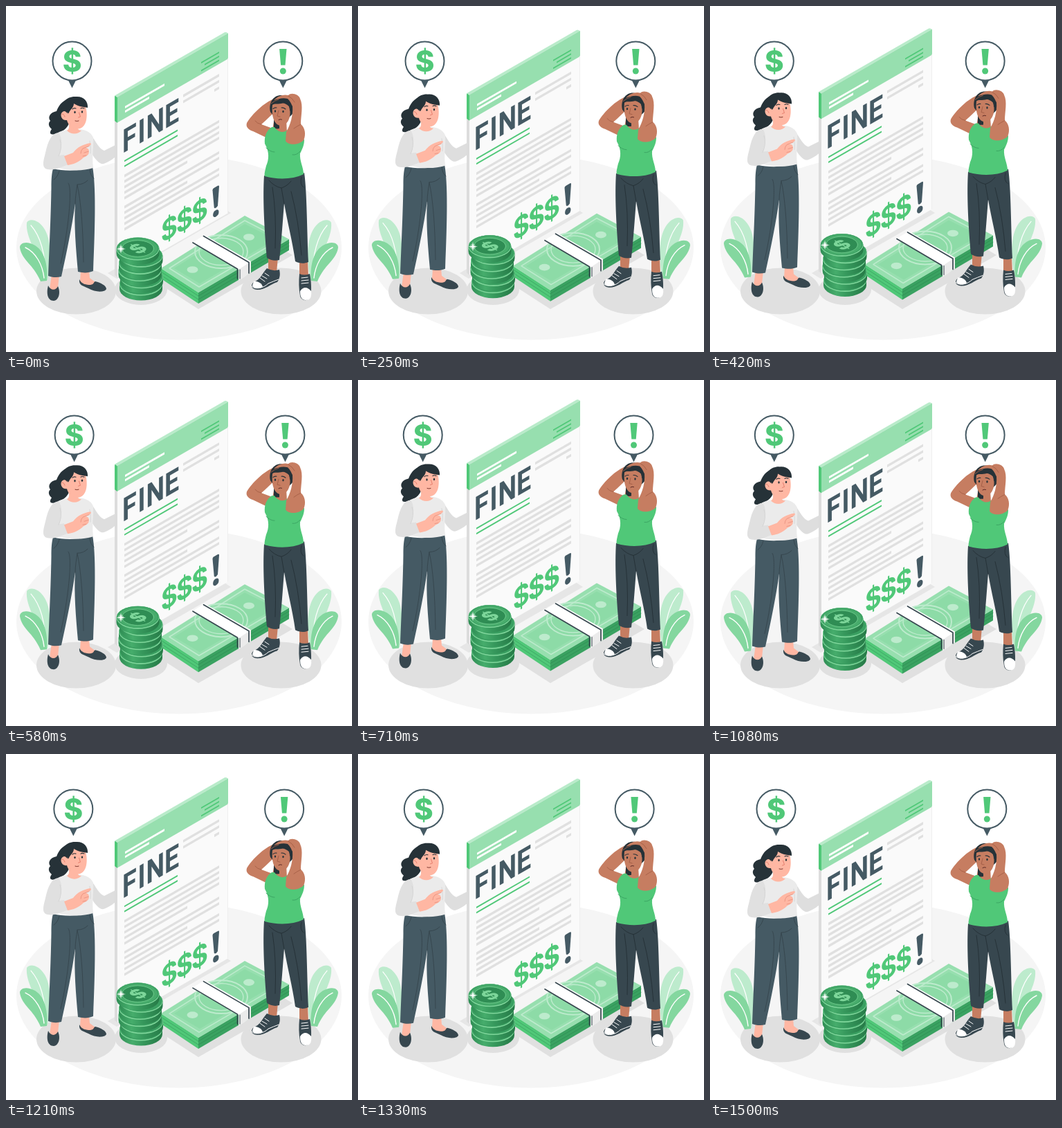
An HTML page with a canvas that plays this animation: 500x500 px, repeating every 1.54 s.

```html
<!DOCTYPE html>
<html lang="en">
<head>
<meta charset="utf-8">
<title>Fine</title>
<style>
html, body { margin: 0; width: 100%; height: 100%; overflow: hidden; background: #fff; }
canvas { display: block; width: 500px; height: 500px; }
</style>
</head>
<body>
<canvas id="stage"></canvas>
<script>
const canvas = document.getElementById('stage');
const ctx = canvas.getContext('2d');
const ratio = window.devicePixelRatio || 1;
canvas.width = canvas.height = 500 * ratio;

const GREEN = '#50c878', LIGHT = '#97dfaf', PALE = '#bdebcd', DEEP = '#2f8d54';
const SLATE = '#455a64', DARK = '#37474f', INK = '#263238';
const GREY = '#e0e0e0', PEACH = '#ffb7a3', BROWN = '#c67d61', SHADE = '#a55f47';
const ISO = 0.577;

const fill = (color, d) => { ctx.fillStyle = color; ctx.fill(new Path2D(d)); };

function stroke(color, width, d) {
  ctx.strokeStyle = color;
  ctx.lineWidth = width;
  ctx.lineCap = ctx.lineJoin = 'round';
  ctx.stroke(new Path2D(d));
}

function ellipse(color, x, y, rx, ry, angle = 0, line = 0) {
  ctx.beginPath();
  ctx.ellipse(x, y, rx, ry, angle, 0, 7);
  ctx.lineWidth = line;
  ctx.fillStyle = ctx.strokeStyle = color;
  line ? ctx.stroke() : ctx.fill();
}

function bar(color, x1, x2, y, height) {
  ctx.fillStyle = color;
  ctx.fillRect(x1, y - height / 2, x2 - x1, height);
}

function within(matrix, draw) {
  ctx.save();
  ctx.transform(...matrix);
  draw();
  ctx.restore();
}

const at = (x, y, draw) => within([1, 0, 0, 1, x, y], draw);

function label(text, font, color, align = 'center') {
  ctx.font = font;
  ctx.fillStyle = color;
  ctx.textAlign = align;
  ctx.fillText(text, 0, 0);
}

function ground() {
  ellipse('#f5f5f5', 250, 349, 235, 133.5);
  ellipse(GREY, 101.5, 412, 57.5, 33.5);
  ellipse(GREY, 397.5, 412, 58, 33.5);
  fill('#e6e6e6', 'M147 386L160 394L325 299L311 290Z');
  ellipse(GREY, 195, 410, 38, 22);
  fill(GREY, 'M216 398L278 438L414 360L345 318Z');
}

function plant() {
  fill(PALE, 'M60 396C66 366 65 338 56 323C48 309 34 306 30 313C28 335 45 352 54 396Z');
  stroke('#fff', 1.2, 'M36 317C51 334 57 358 57 392');
  fill('#84d79f', 'M59 397C61 373 55 354 42 346C30 339 20 342 20 349C23 368 39 372 50 398Z');
  stroke('#fff', 1.4, 'M28 349C43 356 53 374 55 393');
}

function page() {
  fill('#dcdcdc', 'M157 165L161 167L161 392L157 389Z');
  fill(GREEN, 'M157 131Q157 129 159 130L161 132L161 169L157 166Z');
  fill('#b9ebca', 'M157 129.5L316 38Q318 37 321 39.5L161 132Z');
  within([1, -ISO, 0, 1, 161, 131.5], () => {
    ctx.fillStyle = '#fafafa';
    ctx.fillRect(0, 0, 160, 260);
    ctx.fillStyle = LIGHT;
    ctx.fillRect(0, 0, 160, 37);
    bar('#ebebeb', 159.2, 160, 148, 224);
    bar('#fff', 11, 68, 21.3, 3.2);
    bar('#fff', 11, 46, 27.5, 3.2);
    bar(GREEN, 121, 147, 20.3, 2);
    bar(GREEN, 126, 147, 26, 2);
    bar(GREEN, 121, 147, 31.7, 2);
    [['F', 7], ['I', 29.5], ['N', 41.5], ['E', 68]].forEach(([letter, x]) =>
      within([0.8, 0, 0, 1, x, 85.7], () => label(letter, '700 47px Roboto, sans-serif', SLATE, 'left')));
    bar(GREEN, 10, 87, 98.4, 2.2);
    bar(GREEN, 10, 87, 105.8, 2.2);
    bar(GREY, 95, 147, 53.3, 3.8);
    bar(GREY, 95, 147, 62, 3.8);
    bar(GREY, 140, 147, 71.4, 3.8);
    [120, 128, 136, 144, 152, 165, 173, 181, 189, 197].forEach((y, i) =>
      bar(GREY, 10, i === 4 || i === 7 ? 101 : 147, y, 3.8));
    for (const x of [75, 97, 119])
      within([0.866, 0, 0, 1, x, 248], () => label('$', '700 42px Inter, sans-serif', GREEN));
    fill(SLATE, 'M137.5 214Q137.5 212 139.5 212L145 212Q147 212 147 214L145 241Q142.3 244 139.8 241Z');
    ellipse(SLATE, 142.3, 250.3, 4.2, 4.8);
  });
}

function money() {
  fill(GREEN, 'M224 379L278 414L278 430L224 394Z');
  fill('#3aa261', 'M278 414L409 337L409 353L278 430Z');
  for (const y of [5, 10]) {
    at(0, y, () => {
      stroke('#3aa261', 0.8, 'M224 379L278 414');
      stroke('#2f8d54', 0.8, 'M278 414L409 337');
    });
  }
  fill(LIGHT, 'M224 379L345 303L409 337L278 414Z');
  stroke(PALE, 1.6, 'M236 379L345 310L397 337L279 406Z');
  fill('#8ddba7', 'M243 379L345 315L389 337L280 401Z');
  ellipse(PALE, 311, 355, 38, 24, 0, 2);
  ellipse(PALE, 311, 355, 32, 19.5, 0, 1.4);
  ellipse(PALE, 269.5, 381, 8, 4.8);
  ellipse(PALE, 351, 334, 8, 4.8);
  fill('#fff', 'M269 342L287 331L354 369L354 385L336 397L336 381Z');
  fill('#ebebeb', 'M336 381L354 369L354 385L336 397Z');
  stroke(DARK, 1.7, 'M270 342L334.5 380L334.5 394M285.5 332.5L351 370.5L351 386');
  stroke(DARK, 1, 'M338 381L338 394');
}

function coin(x, y) {
  const edge = ctx.createLinearGradient(x - 31, 0, x + 31, 0);
  edge.addColorStop(0, '#2f8d54');
  edge.addColorStop(0.3, '#46ad6c');
  edge.addColorStop(0.55, '#36985c');
  edge.addColorStop(1, '#267a47');
  ctx.fillStyle = edge;
  ctx.beginPath();
  ctx.ellipse(x, y + 7, 31, 16.5, 0, 0, Math.PI);
  ctx.ellipse(x, y, 31, 16.5, 0, Math.PI, 0);
  ctx.fill();
  ellipse('#7fd69b', x, y, 31, 16.5);
  ellipse('#3a9f61', x, y - 0.7, 30.3, 15.6);
}

function coins() {
  [195, 196, 193.5, 194, 195.5, 190.5].forEach((x, i) => coin(x, 402 - i * 10.2));
  ellipse('#48ac6c', 190.5, 350.5, 28.5, 14.6);
  ellipse(DEEP, 190.5, 350.5, 22.5, 11.5);
  ellipse('#6fcb8d', 190.5, 350.5, 23, 11.8, 0, 0.9);
  within([0.87, -0.5, 0.87, 0.5, 198.6, 355.2], () =>
    label('$', '800 26px Inter, sans-serif', '#7dd69a'));
  ctx.globalAlpha = 0.35;
  ellipse('#fff', 166, 351, 4, 4);
  ctx.globalAlpha = 1;
  fill('#fff', 'M166 344L167 350L173 351L167 352L166 358L165 352L159 351L165 350Z');
}

function woman() {
  // Feet and trousers
  fill(PEACH, 'M66 388L77 388L75 407Q73 415 63 409ZM108 382L120 382L121 393Q128 398 132 402L116 405L107 398Z');
  fill(DARK, 'M61 404C64 411 72 412 75 405C79 413 77 425 69 426C60 426 58 415 61 404Z');
  fill(DARK, 'M106 395C109 402 116 403 122 403C128 402 126 399 129 398C137 400 145 404 145 409C143 414 129 414 119 408C111 404 105 404 106 395Z');
  fill(SLATE, 'M68 235C85 239 108 239 125 232C130 260 129 310 126 383C119 386 112 386 104 384C101 350 98 315 100 285C96 315 88 355 80 391C73 393 66 392 61 390C63 340 65 300 65.5 262C65.5 250 66 242 68 235Z');
  stroke(DARK, 1, 'M100 286C100 276 102 266 103 258Q112 258 118 252M90 256C96 262 91 320 79 372M103 258Q111 295 112 370M77 238Q75 247 69 251M121 236Q122 246 127 249');
  // Hair behind the head
  fill(INK, 'M88 135C77 140 75 148 73 152C63 154 60 161 64 166C59 171 64 176 66 178C62 183 64 187 70 185C80 182 90 178 92 166Z');
  // Sweater
  fill('#dedede', 'M122 185C130 196 135 207 142 209L158 201L158 218C151 224 142 229 138 228C131 225 126 217 122 210Z');
  fill('#ebebeb', 'M75 183C82 179 90 179 97 178C109 177 122 180 126 190C127 203 124 215 126 234C110 239 91 238 76 234C79 216 74 200 75 183Z');
  fill('#e0e0e0', 'M76 183C66 184 61 194 57 212C54 224 51 234 60 236C70 238 80 233 90 229L84 215L77 216C81 204 82 191 76 183Z');
  stroke('#d2d2d2', 0.8, 'M78 193Q82 205 76 217M121 195Q123 207 122 213');
  fill(PEACH, 'M89 166C92 172 92 178 88 180C95 187 105 185 109 180C104 180 103 177 104 172Z');
  fill(PEACH, 'M84 217L97 212C103 204 111 200 122 198C124.5 199.5 122 202.5 114 205C118 205 120.5 207 119.5 210C121 214 117 217 112 219C105 226 97 229 89 230Z');
  stroke('#e58f7d', 0.8, 'M120 202.5L111 206Q108 209 108 213M119.5 210L113 212M116 216L111 217');
  // Head
  fill(PEACH, 'M91 141C100 136 115 139 116 149C118 161 116 174 107 177C98 180 90 173 88 165C82 166 78 160 80 155C83 150 87 152 88 155Z');
  fill(INK, 'M81 153C78 139 89 130 101 131C112 130 119 138 118 147C112 146 104 145 98 141C98 147 93 149 91 154C89 157 89 154 88 153C86 150 83 151 81 153Z');
  ellipse(INK, 99.5, 153.5, 1.2, 1.7);
  ellipse(INK, 110, 153, 1.2, 1.7);
  stroke(INK, 1.1, 'M96 149Q98 147 101 148M108 148Q110 146.5 113 148');
  stroke('#e57f6e', 1, 'M105.5 154L107.5 160L104.5 161M81 156Q84 156 85 160');
  stroke('#7a352d', 1, 'M100 166Q102.5 167 105 166');
}

function worrier() {
  // Ankles and sneakers
  fill(BROWN, 'M379 361L393 363L391 385L379 384ZM424 368L436 369L437 390L424 390Z');
  fill(DARK, 'M377 379Q386 384 395 381C397 389 395 395 392 399C382 402 375 410 363 410C354 409 353 403 358 399C367 396 370 387 377 379Z');
  fill('#fff', 'M358 398C364 397 370 401 371 406C365 409 357 408 356 404Z');
  stroke('#fff', 1, 'M355 405C361 411 373 407 379 401Q386 398 394 395M370 390L377 394M367 393L374 398M374 386L380 390');
  fill(DARK, 'M424 387Q431 390 439 387C441 396 442 412 440 420C437 427 427 427 425 419C423 408 423 398 424 387Z');
  fill('#fff', 'M425 412Q432 402 441 412C442 422 439 425 433 425C427 425 425 420 425 412Z');
  stroke('#fff', 1, 'M427 393L436 392M427 397L437 396M427 401L437 400');
  fill(DARK, 'M373 245C390 250 415 250 431 241C435 268 435 330 437 370C430 373 424 372 418 369C414 340 406 310 402 285C400 310 398 340 395 367C388 369 382 367 377 364C373 320 371 275 373 245Z');
  stroke(INK, 1, 'M402 286L398 263Q388 261 380 252M398 263Q407 260 412 253M385 262Q391 300 389 350M427 247Q424 258 430 262M412 268Q423 310 427 360');
  // Far arm, neck, top
  fill(BROWN, 'M388 134C373 139 355 157 348 169C346 175 351 179 357 181L380 192L388 178L369 171C377 164 383 158 388 153Z');
  stroke(SHADE, 0.9, 'M369 171Q363 170 360 166');
  fill(BROWN, 'M388 162L405 165L406 182Q397 191 385 178Z');
  fill(INK, 'M387 164L395 171L395 177C391 178 388 177 387 175Z');
  fill(GREEN, 'M384 175C376 180 373 189 374 199C381 211 380 222 376 231C374 239 373 244 374 246C392 251 414 251 430 243C430 233 424 224 425 213C429 205 431 200 431 193L407 179C402 184 393 183 388 175Z');
  stroke('#3aa261', 0.9, 'M376 205Q382 211 388 211M425 210Q420 216 414 215');
  // Head
  fill(INK, 'M382 153C379 139 387 128 399 129C411 129 419 140 414 156L408 162L386 158Z');
  fill(BROWN, 'M385 143C392 138 403 139 409 145C413 156 409 171 399 173C389 174 383 162 385 143Z');
  fill(INK, 'M382 149C383 138 391 132 401 133C411 134 416 141 414 154L410 151C410 144 407 141 402 140C396 142 390 141 385 142Z');
  ellipse(INK, 389, 152, 1.2, 1.7);
  ellipse(INK, 400.5, 152.5, 1.2, 1.7);
  stroke(INK, 1.1, 'M386 148.5Q388 146.5 391 147M398 147Q401 146.5 404 149');
  stroke(SHADE, 1, 'M394 151L392 159L396 160');
  stroke('#5b2925', 1, 'M394 164.5Q396 163 398.5 164');
  // Near arm over the head
  fill(BROWN, 'M387 136C393 130 401 127 408 129C412 124 424 128 425 134C430 144 426 158 426 171C432 175 434 186 430 194C422 202 407 201 404 195L405 182C411 172 415 158 414 145C412 141 411 138 407 134C400 132 394 134 387 136Z');
  stroke(SHADE, 0.9, 'M426 171Q420 174 416 177M408 130Q414 133 417 139M383 141Q389 136 394 135');
}

function bubble(x, drawMark) {
  at(x, 79.5, () => {
    fill(SLATE, 'M-6 27L6 27L0 39Z');
    ellipse('#fff', 0, 0, 28, 28);
    ellipse(SLATE, 0, 0, 28, 28, 0, 2);
    drawMark();
  });
}

const dollar = () => at(0, 15.5, () => label('$', '800 42px Inter, sans-serif', GREEN));

function bang() {
  fill(GREEN, 'M-5.2 -17.5L5.2 -17.5L3.2 6L-3.2 6Z');
  ellipse(GREEN, 0, 14.5, 4.5, 4.5);
}

// Sideways offset at each tenth of the cycle
const SHAKE = [0, -1, 2, -4, 4, -4, 4, -4, 2, -1, 0];

function shakeAt(progress) {
  const i = Math.min(9, Math.floor(progress * 10));
  return SHAKE[i] + (SHAKE[i + 1] - SHAKE[i]) * (progress * 10 - i);
}

const floatAt = progress => -10 * (1 - Math.abs(1 - 2 * progress));

function draw(time) {
  // 24 steps per second; the last step returns to rest
  const step = Math.min(36, Math.floor((time % 1540 + 4.9) * 0.024));
  const progress = step / 36;
  ctx.setTransform(ratio, 0, 0, ratio, 0, 0);
  ctx.fillStyle = '#fff';
  ctx.fillRect(0, 0, 500, 500);
  ground();
  at(0, floatAt(progress), () => {
    plant();
    within([-1, 0, 0, 1, 500, 0], plant);
    woman();
    page();
    money();
    coins();
    worrier();
  });
  const shake = shakeAt(progress);
  bubble(95.5 + shake, dollar);
  bubble(400.3 + shake, bang);
}

const start = performance.now();
function tick() {
  draw(performance.now() - start);
  requestAnimationFrame(tick);
}
tick();
</script>
</body>
</html>
```
